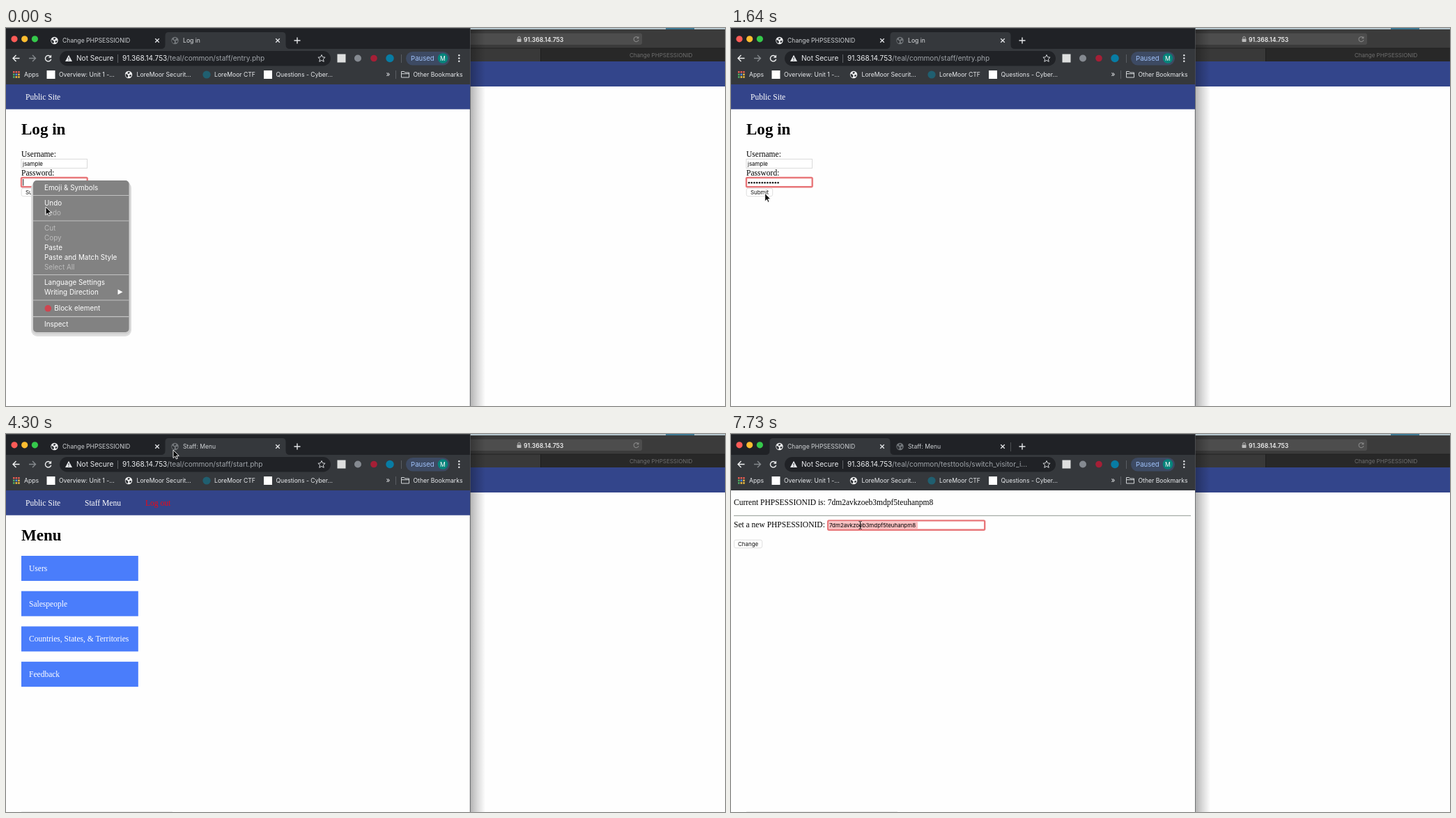
Recreate the animation shown at these times as an HTML page. Size 1032x543 px, loop 8 s.

```html
<!DOCTYPE html>
<html lang="en">
<head>
<meta charset="utf-8">
<title>Session demo</title>
<style>
html, body { margin: 0; width: 100%; height: 100%; overflow: hidden; background: #fefefe; }
svg { display: block; width: 1032px; height: 543px; }
text { white-space: pre; }
.ui { font: 8.64px Inter, sans-serif; }
.bar { font: 10.08px Inter, sans-serif; }
.menu { font: 9.9px Inter, sans-serif; }
.field { font: 7.95px Inter, sans-serif; }
.page { font: 11.52px "Liberation Serif", serif; }
.head { font: bold 23.04px "Liberation Serif", serif; }
</style>
</head>
<body>
<svg id="stage" viewBox="0 0 1032 543"></svg>
<script>
const HOST = '91.368.14.753';
const TOKEN = '7dm2avkzoeb3mdpf5teuhanpm8';
const ROOT = '/teal/common/';

const text = (cls, x, y, s, fill = '#000', extra = '') =>
  `<text class="${cls}" x="${x}" y="${y}" fill="${fill}" ${extra}>${s.replace(/&/g, '&amp;')}</text>`;
const rect = (x, y, w, h, fill, extra = '') =>
  `<rect x="${x}" y="${y}" width="${w}" height="${h}" fill="${fill}" ${extra}/>`;
const dot = (x, y, r, fill, extra = '') => `<circle cx="${x}" cy="${y}" r="${r}" fill="${fill}" ${extra}/>`;
const line = (d, color, w = 1.3, extra = '') =>
  `<path d="${d}" fill="none" stroke="${color}" stroke-width="${w}" ${extra}/>`;
const group = (id, body) => `<g id="${id}">${body}</g>`;

const globe = (x, y, color) => dot(x, y, 5.2, color) +
  `<path transform="translate(${x} ${y})" fill="#303337" d="M-4-1.500L-1 .5-.5 2-1.500 4.200A4.500 4.500 0 0 1-4-1.500ZM-1-4L2-3.500 1-1.500-1.500-1ZM1 .5L4 0 3.500 2.500 1.500 3Z"/>`;
const cross = (x, color = '#e4e6e9') => line(`M${x - 2.8} 15.200l5.600 5.600m0-5.600l-5.600 5.600`, color);
const reload = (x, y, r, color) =>
  line(`M${x + r * .8} ${y - r * .6}A${r} ${r} 0 1 0 ${x + r} ${y + r * .3}`, color, r / 3) +
  `<path d="M${x + r * 1.1} ${y - r * 1.2}v${r}h${-r}Z" fill="${color}"/>`;
const button = (x, y, w, s) =>
  rect(x, y, w, 11.5, '#fff', 'rx="2.500" stroke="#d2d2d2" stroke-width=".7"') +
  text('field', x + w / 2, y + 8.7, s, '#111', 'text-anchor="middle"');
const input = (x, y, w) => rect(x, y, w, 13, '#fff', 'stroke="#d6d6d6" stroke-width=".9"');
const ring = (x, y, w, h) => rect(x, y, w, h, '#fff', 'rx="1.500" stroke="#e8777a" stroke-width="2.400"');
const url = path => text('bar', 167, 47.3, `${HOST}<tspan fill="#a0a5aa">${ROOT}${path}</tspan>`, '#eceef0');
const tab = x => `<path d="M${x - 6} 30Q${x} 30 ${x} 24V11Q${x} 6 ${x + 5} 6H${x + 168}Q${x + 173} 6 ${x + 173} 11V24Q${x + 173} 30 ${x + 179} 30Z" fill="#35383c"/>`;

function otherWindow() {
  return rect(666, 0, 366, 3, '#b4c4cb') + rect(947, 0, 41, 2, '#3d7893') +
    rect(666, 2, 366, 27, '#3b3b3b') + rect(655, 7.5, 258, 16.5, '#4d4d4d', 'rx="3"') +
    rect(666, 29, 101, 19, '#393939') + rect(767, 29, 265, 19, '#282828') +
    line('M666 29H1032M767.500 29V48', '#1d1d1d', .8) +
    rect(733.5, 15.5, 6, 4.5, '#bbb', 'rx=".7"') + line('M734.800 15.500v-1.500a1.700 1.700 0 0 1 3.400 0v1.500', '#bbb', .9) +
    text('ui', 743, 19.6, HOST, '#ededed', 'font-weight="600" style="font-weight:600"') +
    reload(904.5, 16, 3.5, '#858585') +
    text('ui', 895, 41.5, 'Change PHPSESSIONID', '#707070', 'style="font-size:8px"') +
    rect(666, 48, 366, 36, '#33458b') +
    rect(666, 3, 22, 540, 'url(#shade)');
}

function tabStrip() {
  return rect(0, 0, 666, 31, '#202226') + rect(0, 0, 666, 1, '#3c3f43') +
    group('tabLeft', tab(55.5) + line('M401.500 12V25', '#5a5d61', .8)) +
    group('tabRight', tab(228.5)) +
    ['#fc5b57', '#fdbd30', '#35c94b'].map((c, i) => dot(12 + i * 14.7, 15.8, 4.6, c)).join('') +
    globe(69.5, 18, '#f2f3f4') + text('ui', 81, 21.1, 'Change PHPSESSIONID', '#cdd0d3') + cross(217) +
    globe(242.5, 18, '#73777b') +
    group('titleLogin', text('ui', 254, 21.1, 'Log in', '#dadcdf')) +
    group('titleStaff', text('ui', 254, 21.1, 'Staff: Menu', '#cdd0d3')) +
    cross(390) + line('M413.500 18h9m-4.500-4.500v9', '#e4e6e9', 1.4);
}

function toolbar() {
  const light = '#e8eaed';
  const colors = ['#e65b50', '#e65b50', '#e65b50', '#50aa61', '#4c8df5', '#efbf42', '#50aa61', '#efbf42', '#efbf42'];
  const apps = colors.map((c, i) => rect(10 + i % 3 * 3.6, 62 + (i / 3 | 0) * 3.6, 2.5, 2.5, c)).join('');
  return rect(0, 30, 666, 51, '#35383c') + rect(77, 33, 389, 21.5, '#202226', 'rx="10.700"') +
    line('M19.500 43.500H10m4.500-4.500L10 43.500l4.500 4.500', '#f0f1f2', 1.4) +
    line('M33 43.500h9.500m-4.500-4.500l4.500 4.500-4.500 4.500', '#85898d', 1.4) +
    reload(60.5, 43.5, 4.2, '#f0f1f2') +
    '<path d="M90 38.800L95 48H85Z" fill="#e8eaed"/>' + line('M90 42v2.800m0 1v1.200', '#202226', 1) +
    text('bar', 101, 47.3, 'Not Secure', light) + line('M160.500 38V50', '#65686c', .9) +
    group('urlLogin', url('staff/entry.php')) +
    group('urlStaff', url('staff/start.php')) +
    group('urlTool', url('testtools/switch_visitor_i...')) +
    line('M453 38.500l1.500 3.300 3.600.4-2.700 2.500.8 3.600-3.200-1.900-3.200 1.900.8-3.600-2.700-2.500 3.600-.4Z', '#d5d8db', 1) +
    rect(475.5, 37.5, 12, 12, '#dedfdf') + dot(505, 43.5, 5, '#858a91') +
    dot(528, 43.5, 4.8, '#a51f36') + dot(551, 43.5, 5.7, '#087ca4') +
    line('M567.500 38V50', '#5f6468', .9) +
    rect(574, 34, 63, 19.5, '#3d4a63', 'rx="9.750"') + text('bar', 581, 47.1, 'Paused', '#9fc2fa', 'style="font-size:9.600px"') +
    dot(627, 43.5, 7.3, '#06847b') + text('ui', 627, 46.5, 'M', '#fff', 'text-anchor="middle"') +
    [39.2, 43.5, 47.8].map(y => dot(650.3, y, 1.2, light)).join('') +
    apps + text('ui', 26, 69.8, 'Apps', light) +
    rect(58.5, 61, 12, 12, '#fff') + text('ui', 76, 69.8, 'Overview: Unit 1 -...', light) +
    globe(176, 67, '#f2f3f4') + text('ui', 187.5, 69.8, 'LoreMoor Securit...', light) +
    dot(288, 67, 5.6, '#205f70') + text('ui', 299, 69.8, 'LoreMoor CTF', light) +
    rect(370, 61, 12, 12, '#fff') + text('ui', 387.5, 69.8, 'Questions - Cyber...', light) +
    text('bar', 545.5, 70, '»', light) + line('M559.500 61V73', '#5f6468', .9) +
    line('M567.500 71V62.500h4l1.300 1.500h5.700V71ZM567.500 65.700h11', '#cfd2d5', 1) +
    text('ui', 584.5, 69.8, 'Other Bookmarks', light);
}

function navPages() {
  const cards = ['Users', 'Salespeople', 'Countries, States, & Territories', 'Feedback'];
  return rect(0, 81, 666, 35.7, '#33448a') + text('page', 28, 103, 'Public Site', '#fff') +
    group('login',
      text('head', 22, 153, 'Log in') +
      text('page', 22, 185, 'Username:') + input(22, 188.3, 94.5) + text('field', 24, 197.8, 'jsample') +
      text('page', 22, 212, 'Password:') + ring(22, 215, 94.7, 13.3) +
      button(22.2, 230.2, 37.5, 'Submit') +
      group('caret', rect(24.2, 217, 1, 9.5, '#222')) +
      group('dots', [...Array(12).keys()].map(i => dot(25.8 + i * 3.8, 222.2, 1.25, '#111')).join(''))) +
    group('staff',
      text('page', 113, 103, 'Staff Menu', '#fff') + text('page', 200, 103, 'Log out', '#f00614') +
      text('head', 22, 153, 'Menu') +
      cards.map((s, i) => rect(22, 175 + i * 50.7, 167.8, 36, '#4a7dfb', `id="card${i}"`) +
        text('page', 33, 196.8 + i * 50.7, s, '#fff')).join(''));
}

function toolPage() {
  return group('tool', rect(0, 81, 666, 462, '#fefefe') +
    text('page', 4, 102, 'Current PHPSESSIONID is: ' + TOKEN) +
    line('M4 117.300H660', '#8f9892', 1) +
    text('page', 4, 134.3, 'Set a new PHPSESSIONID:') + input(139.4, 124.5, 224.5) +
    group('focus', ring(139.2, 124.4, 225, 13.4)) +
    group('selection', rect(141, 126.2, 127, 9.8, '#f8bfc0')) +
    text('field', 141, 134, TOKEN) +
    group('toolCaret', rect(185, 126.5, .9, 9.5, '#222')) +
    button(4.5, 152.2, 40.2, 'Change'));
}

function contextMenu() {
  const items = [[233, 'Emoji & Symbols', 1], [255.3, 'Undo', 1], [269.2, 'Redo'], [291.3, 'Cut'], [305.2, 'Copy'],
    [319, 'Paste', 1], [332.8, 'Paste and Match Style', 1], [346.5, 'Select All'], [369.2, 'Language Settings', 1],
    [383, 'Writing Direction', 1], [429.3, 'Inspect', 1]];
  return group('menu',
    group('menuShadow', rect(36, 221, 144, 222, '#dedede', 'rx="9"') + rect(37.5, 220, 141, 220, '#d0d0d0', 'rx="7"')) +
    rect(39, 219, 137.5, 218, '#828282', 'id="menuBack" rx="5"') +
    group('highlight', rect(39, 309, 137.5, 13.6, '#f17d81')) +
    [240.5, 277, 354.5, 391, 414.6].map(y => line(`M39 ${y}H176.500`, '#c2c2c2', 1.2)).join('') +
    items.map(([y, s, on]) => text('menu', 55, y, s, on ? '#fff' : '#bcbcbc')).join('') +
    '<path d="M160.500 375.500L167.500 379.300 160.500 383Z" fill="#fff"/>' +
    dot(60.3, 402.8, 4.8, '#cf4550') + text('menu', 69.3, 406, 'Block element', '#fff'));
}

const stage = document.getElementById('stage');
stage.innerHTML =
  `<defs><linearGradient id="shade"><stop stop-opacity=".3"/><stop offset=".5" stop-opacity=".14"/><stop offset="1" stop-opacity="0"/></linearGradient></defs>` +
  rect(0, 0, 1032, 543, '#fefefe') + otherWindow() + rect(0, 0, 666, 543, '#fefefe') +
  line('M666.300 0V543', '#55575a', .9) + tabStrip() + toolbar() + navPages() + toolPage() +
  group('status', rect(22, 542, 217, 1, '#ececec')) + contextMenu() +
  group('arrow', '<path d="M0 0V11.500L2.700 9 4.400 12.900 6.300 12.100 4.600 8.300H8.200Z" fill="#0a0a0a" stroke="#fff" stroke-width=".9"/>') +
  group('beam', line('M-2-5.500Q0-5.500 0-4.500Q0-5.500 2-5.500M0-4.500V4.500M-2 5.500Q0 5.500 0 4.500Q0 5.500 2 5.500M-1.200 1.500h2.400', '#111', 1));

const part = {};
stage.querySelectorAll('[id]').forEach(el => part[el.id] = el);

// Pointer samples: time, x, y.
const pointer = [
  [0, 57, 257], [150, 62, 272], [300, 71, 298], [450, 76, 313.5],
  [1200, 70, 290], [1340, 58, 258], [1490, 51, 242], [1640, 48.7, 237.5],
  [3260, 110, 190], [3410, 218.5, 113.7], [3550, 248, 80], [3700, 261, 58], [3850, 263, 44],
  [4000, 258, 34], [4150, 248, 26], [4300, 240, 23], [4450, 195, 19], [4600, 168.5, 17],
  [5350, 175, 40], [5500, 187, 75], [5650, 193, 105], [5790, 188, 121], [5940, 185.5, 131]
];

const show = (id, on) => part[id].style.display = on ? '' : 'none';

function draw(t) {
  const staff = t >= 2380, tool = t >= 4450;
  show('tabLeft', tool);
  show('tabRight', !tool);
  show('titleLogin', !staff);
  show('titleStaff', staff);
  show('urlLogin', !staff);
  show('urlStaff', staff && !tool);
  show('urlTool', tool);
  show('login', !staff);
  show('staff', staff && !tool);
  show('tool', tool);
  show('status', staff);

  const pasted = t >= 1050;
  show('menu', !pasted);
  show('highlight', t >= 450);
  show('caret', !pasted);
  show('dots', pasted);
  part.menuBack.setAttribute('opacity', t < 750 ? 1 : t < 900 ? .92 : .8);
  part.menuShadow.setAttribute('opacity', t < 750 ? 1 : t < 900 ? .6 : .15);

  const overUsers = t >= 3260 && t < 3550;
  part.card0.setAttribute('fill', overUsers ? '#3f70e0' : '#4a7dfb');
  show('focus', t >= 6240);
  show('toolCaret', t >= 6240 && t < 7730);
  show('selection', t >= 7730);

  const [, x, y] = pointer.findLast(p => p[0] <= t);
  const beam = t >= 5940;
  show('arrow', !beam);
  show('beam', beam);
  part[beam ? 'beam' : 'arrow'].setAttribute('transform', `translate(${x} ${y})`);
}

const start = performance.now();
function tick() {
  draw((performance.now() - start) % 8000);
  requestAnimationFrame(tick);
}
tick();
</script>
</body>
</html>
```
